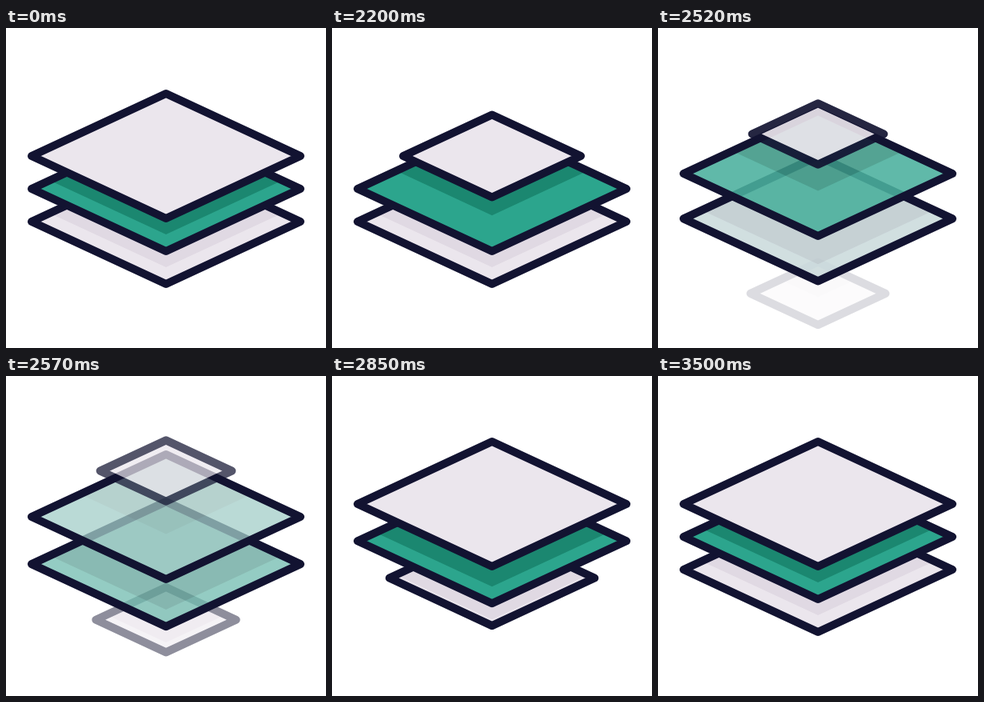
These frames come from a looping animation (400x400 px, 3520 ms). An HTML page:

```html
<!DOCTYPE html>
<html lang="en">
<head>
<meta charset="utf-8">
<title>Layers</title>
<style>
  html, body { margin: 0; width: 100%; height: 100%; overflow: hidden; background: #fff; }
  svg { display: block; width: 100vw; height: 100vh; }
</style>
</head>
<body>
<svg id="stage" viewBox="0 0 400 400"></svg>
<script>
const LOOP = 3520, HALF = 78, ASPECT = 168 / 78, GAP = 41;
const INK = '#121331';
const LIGHT = { fill: '#ebe6ed', shade: '#e0d9e3' };
const GREEN = { fill: '#2ca58d', shade: '#1b8770' };
const stage = document.getElementById('stage');

const clamp = v => Math.min(1, Math.max(0, v));
const mix = (a, b, p) => a + (b - a) * p;
const ramp = (t, start, end) => clamp((t - start) / (end - start));

// Cubic bezier easing between two times, with the second handle at (x2, 1).
function ease(t, start, end, x1, x2, y1 = 0) {
  const x = ramp(t, start, end);
  const curve = (s, a, b) => 3 * a * s * (1 - s) ** 2 + 3 * b * s * s * (1 - s) + s ** 3;
  let low = 0, high = 1;
  for (let i = 0; i < 24; i++) {
    const s = (low + high) / 2;
    if (curve(s, x1, x2) < x) low = s; else high = s;
  }
  return x === 0 || x === 1 ? x : curve(low, y1, 1);
}

function rhombus(top, bottom, attrs) {
  const y = (top + bottom) / 2, w = (bottom - top) / 2 * ASPECT;
  return `<path d="M${200 - w} ${y}L200 ${top}L${200 + w} ${y}L200 ${bottom}Z" ${attrs}/>`;
}

// paints: [colours, opacity, y of the shadow's lower tip (optional)]
function layer(y, half, paints, opacity = 1) {
  const top = y - half, bottom = y + half;
  const fills = paints.map(([colours, alpha, tip]) =>
    `<g opacity="${alpha}">${rhombus(top, bottom, `fill="${colours.fill}"`)}` +
    (tip ? rhombus(top, Math.min(tip, bottom), `fill="${colours.shade}"`) : '') + '</g>');
  const outline = `fill="none" stroke="${INK}" stroke-width="10" stroke-linejoin="round"`;
  return `<g opacity="${opacity}">${fills.join('')}${rhombus(top, bottom, outline)}</g>`;
}

function draw(t) {
  const swap = ramp(t, 2500, 2650);
  const topY = 160 - 150 * ease(t, 2331, 3025, 1 / 3, 2 / 3);
  const topHalf = HALF * mix(1, 0.49, ease(t, 2000, 2433, 0.33, 0.33));
  const midY = 201 - GAP * ease(t, 2200, 2867, 0.5, 0.5);
  const midTip = midY + mix(57, 21.5, ease(t, 2000, 2433, 0.25, 0.5, 0.25));
  const lowY = 242 - GAP * ease(t, 2367, 3033, 0.5, 0.5);
  const lowTip = lowY + 57;
  const newY = mix(402, 242, ease(t, 2289, 3189, 0.4, 0));
  const newHalf = HALF * mix(0.49, 1, ease(t, 2430, 3507, 0.33, 0.33));

  stage.innerHTML =
    layer(newY, newHalf, [[LIGHT, 1, lowY + 98]], swap) +
    layer(lowY, HALF, [[LIGHT, 1 - swap, lowTip], [GREEN, swap, lowTip]]) +
    layer(midY, HALF, [[GREEN, 1 - swap, midTip], [LIGHT, swap]]) +
    layer(topY, topHalf, [[LIGHT, 1]], 1 - ramp(t, 2500, 2750));
}

function tick() {
  draw(performance.now() % LOOP);
  requestAnimationFrame(tick);
}
tick();
</script>
</body>
</html>
```
